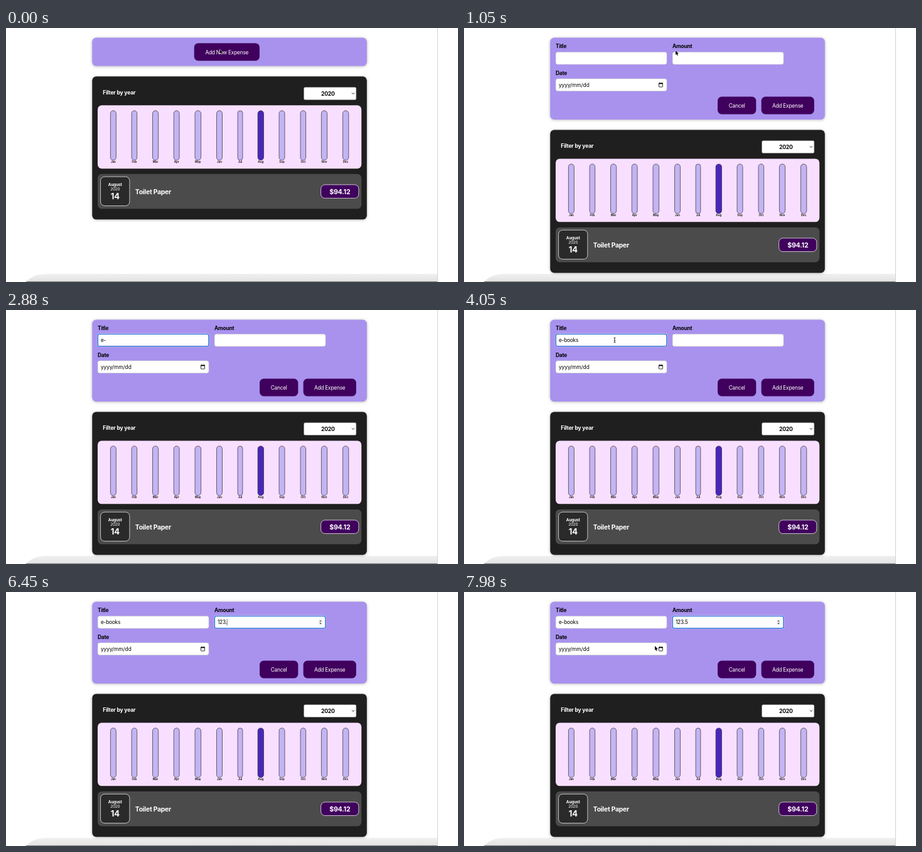
Write an HTML page with a canvas that moves like this. It is 720 px wide and 405 px high and loops after 8000 ms.

```html
<!DOCTYPE html>
<html lang="en">
<head>
<meta charset="utf-8">
<title>Expense form</title>
<style>
html, body { margin: 0; width: 100%; height: 100%; overflow: hidden; background: #fff; }
canvas { display: block; width: 720px; height: 405px; }
</style>
</head>
<body>
<canvas id="stage"></canvas>
<script>
const LOOP = 8000;
const OPEN = 1050;
const PLUM = '#40005d';
const canvas = document.getElementById('stage');
const ctx = canvas.getContext('2d');
const dpr = window.devicePixelRatio || 1;
canvas.width = 720 * dpr;
canvas.height = 405 * dpr;

const months = ['Jan', 'Feb', 'Mar', 'Apr', 'May', 'Jun', 'Jul', 'Aug', 'Sep', 'Oct', 'Nov', 'Dec'];
const barX = [170.9, 204.4, 238.1, 271.7, 305.8, 340, 373, 405.8, 439.5, 473.3, 507, 541.1];
const barW = [9, 8.6, 9.2, 8.8, 9.6, 9, 7.8, 9.4, 9, 8.6, 9.2, 9.4];

// [time, text]
const titleKeys = [[0, ''], [2520, 'e'], [2880, 'e-'], [3150, 'e-b'], [3450, 'e-bo'],
  [3570, 'e-boo'], [3720, 'e-book'], [3870, 'e-books']];
const amountKeys = [[0, ''], [5640, '1'], [5850, '12'], [6150, '123'], [6450, '123.'], [6750, '123.5']];

// [start, end, x, y]
const moves = [[480, 540, 339.5, 35], [720, 1020, 337, 36], [1350, 1800, 240, 48],
  [4050, 4500, 393, 48], [7350, 7950, 304, 86]];

function latest(keys, t) {
  let out = '';
  for (const [at, text] of keys) if (t >= at) out = text;
  return out;
}

function pointerAt(t) {
  let x = 340.5, y = 34;
  for (const [a, b, tx, ty] of moves) {
    const p = Math.min(1, Math.max(0, (t - a) / (b - a)));
    const e = p * p * (3 - 2 * p);
    x += (tx - x) * e;
    y += (ty - y) * e;
  }
  return { x, y };
}

function box(x, y, w, h, r, fill, stroke, line = 0.6) {
  ctx.beginPath();
  ctx.roundRect(x, y, w, h, r);
  if (fill) { ctx.fillStyle = fill; ctx.fill(); }
  if (stroke) { ctx.strokeStyle = stroke; ctx.lineWidth = line; ctx.stroke(); }
}

function panel(y, h, fill) {
  ctx.save();
  ctx.shadowColor = 'rgba(0,0,0,.3)';
  ctx.shadowBlur = 4.4 * dpr;
  ctx.shadowOffsetY = 0.6 * dpr;
  box(137.3, y, 437.5, h, 6.5, fill);
  ctx.restore();
}

// y is the middle of the capitals
function text(s, x, y, size, { weight = 400, color = '#fff', align = 'left', space = -0.2 } = {}) {
  ctx.font = `${weight} ${size}px Inter, "Noto Sans", sans-serif`;
  ctx.letterSpacing = space + 'px';
  ctx.textAlign = align;
  ctx.fillStyle = color;
  ctx.fillText(s, x, y + size * 0.364);
  return ctx.measureText(s).width;
}

function button(x, y, w, label, fill = PLUM) {
  box(x, y, w, 28, 6.5, fill);
  text(label, x + w / 2, y + 14.3, 8.3, { align: 'center' });
}

function poly(points, fill, stroke, line = 0.8) {
  ctx.beginPath();
  points.forEach(([x, y]) => ctx.lineTo(x, y));
  if (fill) { ctx.closePath(); ctx.fillStyle = fill; }
  if (stroke) { ctx.strokeStyle = stroke; ctx.lineWidth = line; ctx.stroke(); }
  if (fill) ctx.fill();
}

function backdrop() {
  ctx.fillStyle = '#fff';
  ctx.fillRect(0, 0, 720, 405);
  const g = ctx.createLinearGradient(0, 392, 0, 405);
  g.addColorStop(0, '#f0f0f0');
  g.addColorStop(1, '#e2e2e2');
  ctx.fillStyle = g;
  ctx.beginPath();
  ctx.moveTo(32, 405);
  ctx.quadraticCurveTo(43, 392, 66, 392);
  ctx.lineTo(687, 392);
  ctx.lineTo(687, 405);
  ctx.fill();
  ctx.fillStyle = '#777';
  ctx.fillRect(32, 404, 656, 1);
  ctx.fillStyle = '#d4d4d4';
  ctx.fillRect(687, 0, 1, 405);
}

function chart() {
  box(146, 123.3, 420.2, 100.9, 6.5, '#f8dfff');
  months.forEach((m, i) => {
    const w = barW[i];
    box(barX[i] - w / 2, 131.8, w, 79, w / 2, m === 'Aug' ? '#4826b9' : '#c3b4f3', '#313131', 0.7);
    text(m, barX[i], 213.6, 4.5, { weight: 700, color: '#222', align: 'center', space: 0 });
  });
}

function expenses(dy) {
  ctx.save();
  ctx.translate(0, dy);
  panel(77.3, 228, '#1f1f1f');
  text('Filter by year', 154.3, 102.6, 8.6, { weight: 700 });
  box(474.5, 94.6, 83.3, 19.8, 2, '#fff', '#8a8a8a');
  text('2020', 512.8, 104.7, 8.6, { weight: 700, color: '#000', align: 'center' });
  poly([[551, 103.3], [553, 105.4], [555, 103.3]], null, '#111', 0.9);
  chart();
  box(146, 232.8, 420.2, 55.5, 6.5, '#4b4b4b');
  box(150.6, 237.1, 46.3, 46.4, 6.5, '#2a2a2a', '#fff', 0.7);
  const mid = { align: 'center', space: -0.1 };
  text('August', 173.8, 249.5, 6.4, { ...mid, weight: 700 });
  text('2020', 173.8, 257.1, 6.3, mid);
  text('14', 173.8, 268.4, 13.1, { ...mid, weight: 700 });
  text('Toilet Paper', 205.8, 261, 10.3, { weight: 700 });
  box(501.6, 249.9, 60.2, 21.5, 6.5, PLUM, '#fff', 0.7);
  text('$94.12', 531.8, 261, 10.6, { weight: 700, align: 'center' });
  ctx.restore();
}

function field(label, x, y, value, focused, caret) {
  text(label, x, y - 8.9, 8.4, { weight: 700, color: '#000' });
  box(x + 0.2, y + 0.2, 176.8, 19.6, 3.2, '#fff', '#ccc');
  if (focused) {
    box(x - 0.5, y - 0.5, 178.2, 21, 3.8, null, '#fff', 0.6);
    box(x + 0.3, y + 0.3, 176.6, 19.4, 3.2, '#fff', '#0b62d0', 1.2);
  }
  const space = label === 'Date' ? 0 : -0.2;
  const w = text(value, x + 4.9, y + 10.2, 8.3, { color: '#000', space });
  if (caret) {
    ctx.fillStyle = '#000';
    ctx.fillRect(x + 4.8 + w, y + 5, 0.6, 10);
  }
}

function spinner() {
  box(498, 43.4, 6, 9.4, 1.5, '#efefef');
  poly([[499.4, 47.1], [501, 45], [502.6, 47.1]], '#444');
  poly([[499.4, 49.3], [501, 51.4], [502.6, 49.3]], '#444');
}

function calendar() {
  box(310.5, 88, 5.9, 6, 0.5, null, '#000', 0.8);
  ctx.fillStyle = '#000';
  ctx.fillRect(310.2, 87.7, 6.5, 1.6);
  ctx.fillRect(311.2, 87, 0.8, 1);
  ctx.fillRect(314.9, 87, 0.8, 1);
}

function form(t, p) {
  panel(15.6, 130.4, '#a892ee');
  const inTitle = t >= 2070 && t < 4400;
  const inAmount = t >= 4400;
  const amountCaret = inAmount && t < 7350 && !(t >= 4920 && t < 5370);
  field('Title', 146, 38.2, latest(titleKeys, t), inTitle, inTitle && t < 2520);
  field('Amount', 332, 38.2, latest(amountKeys, t), inAmount, amountCaret);
  field('Date', 146, 80.7, 'yyyy/mm/dd', false, false);
  const overAmount = p.x > 332 && p.y > 38.2 && p.y < 58;
  if (inAmount || overAmount) spinner();
  calendar();
  button(404, 109.5, 61.3, 'Cancel');
  button(473.6, 109.5, 84.2, 'Add Expense');
}

const pointers = {
  arrow() {
    poly([[0, 0], [0, 6.9], [1.6, 5.5], [2.7, 8], [3.9, 7.5], [2.8, 5.1], [4.9, 4.9]], '#000', '#fff', 1);
  },
  hand() {
    ctx.beginPath();
    ctx.moveTo(-0.8, 0);
    ctx.quadraticCurveTo(0, -1, 0.8, 0);
    ctx.lineTo(1, 2.4);
    ctx.quadraticCurveTo(4.2, 2.3, 4.2, 4);
    ctx.lineTo(3.5, 7.4);
    ctx.lineTo(-0.3, 7.4);
    ctx.lineTo(-2.3, 4.2);
    ctx.quadraticCurveTo(-2, 3.2, -0.7, 4.2);
    ctx.closePath();
    ctx.strokeStyle = '#000';
    ctx.lineWidth = 0.9;
    ctx.stroke();
    ctx.fillStyle = '#fff';
    ctx.fill();
  },
  beam() {
    for (const [color, line] of [['#fff', 1.6], ['#000', 0.8]]) {
      ctx.beginPath();
      ctx.moveTo(-1.5, -4);
      ctx.quadraticCurveTo(0, -4, 0, -3);
      ctx.lineTo(0, 3);
      ctx.quadraticCurveTo(0, 4, -1.5, 4);
      ctx.moveTo(1.5, -4);
      ctx.quadraticCurveTo(0, -4, 0, -3);
      ctx.moveTo(0, 3);
      ctx.quadraticCurveTo(0, 4, 1.5, 4);
      ctx.moveTo(-1, 0.8);
      ctx.lineTo(1, 0.8);
      ctx.strokeStyle = color;
      ctx.lineWidth = line;
      ctx.stroke();
    }
  }
};

function pointer(t, p) {
  const typing = (t >= 2520 && t < 4050) || (t >= 5640 && t < 7350);
  if (typing) return;
  const inRow = p.y > 38.2 && p.y < 58;
  const overInput = t >= OPEN && inRow && (p.x < 323 || p.x > 332);
  const kind = overInput ? 'beam' : t >= 480 && t < OPEN ? 'hand' : 'arrow';
  ctx.save();
  ctx.translate(p.x, p.y);
  pointers[kind]();
  ctx.restore();
}

function draw(t) {
  const p = pointerAt(t);
  ctx.setTransform(dpr, 0, 0, dpr, 0, 0);
  backdrop();
  if (t < OPEN) {
    panel(15.6, 45, '#a892ee');
    button(299.7, 24.2, 104.2, 'Add New Expense', t < 480 ? PLUM : '#510674');
    expenses(0);
  } else {
    form(t, p);
    expenses(85.1);
  }
  pointer(t, p);
}

const start = performance.now();
function tick() {
  draw((performance.now() - start) % LOOP);
  requestAnimationFrame(tick);
}
tick();
</script>
</body>
</html>
```
